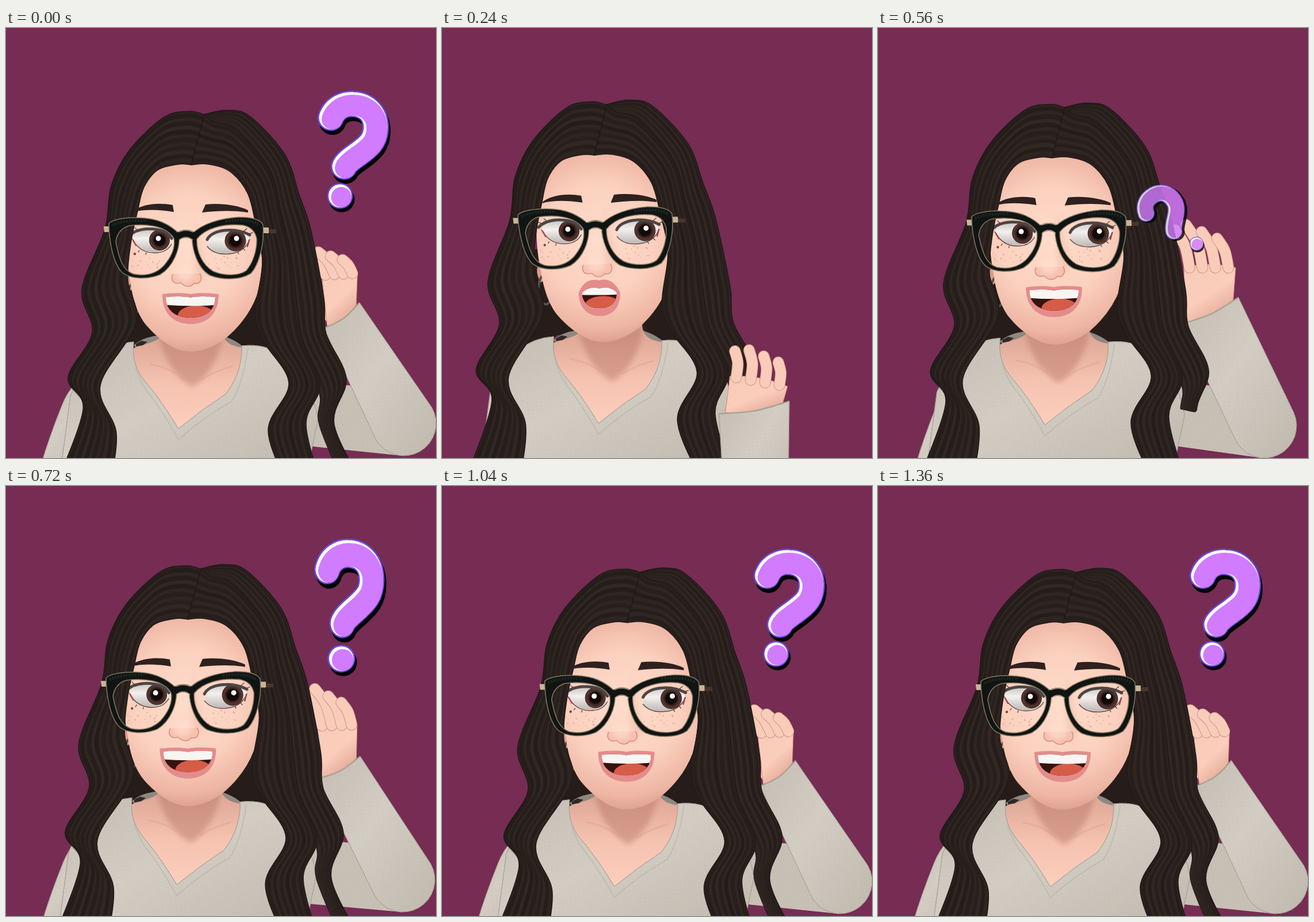
These frames come from a looping animation (748 px wide and 748 px high, 1.44 s). An HTML page:

```html
<!DOCTYPE html>
<html lang="en">
<head>
<meta charset="utf-8">
<title>Curious avatar</title>
<style>
html, body { margin: 0; height: 100%; overflow: hidden; background: #762c53; }
svg { display: block; width: 100vw; height: 100vh; }
</style>
</head>
<body>
<svg id="stage" viewBox="0 0 748 748">
  <defs>
    <radialGradient id="skin" gradientUnits="userSpaceOnUse" cx="318" cy="385" r="195">
      <stop offset="0" stop-color="#ffdccb"/><stop offset=".5" stop-color="#fbd0be"/>
      <stop offset=".8" stop-color="#eeb5a3"/><stop offset="1" stop-color="#d19484"/>
    </radialGradient>
    <linearGradient id="chest" x1="0" y1="0" x2="0" y2="1">
      <stop offset="0" stop-color="#d9a090"/><stop offset=".5" stop-color="#f5c2b0"/><stop offset="1" stop-color="#fdd0be"/>
    </linearGradient>
    <linearGradient id="palmFill" x1="0" y1="0" x2=".6" y2="1">
      <stop offset="0" stop-color="#f7cbb8"/><stop offset=".6" stop-color="#fbcdbb"/><stop offset="1" stop-color="#e3a896"/>
    </linearGradient>
    <linearGradient id="wool" x1="0" y1="0" x2="1" y2="1">
      <stop offset="0" stop-color="#cbc4ba"/><stop offset=".45" stop-color="#dcd6cc"/><stop offset="1" stop-color="#c6bfb4"/>
    </linearGradient>
    <linearGradient id="white" x1="0" y1="0" x2="0" y2="1">
      <stop offset="0" stop-color="#cbc6c3"/><stop offset=".4" stop-color="#f3f0ee"/><stop offset="1" stop-color="#bdb8b6"/>
    </linearGradient>
    <radialGradient id="iris"><stop offset=".5" stop-color="#120a09"/><stop offset=".65" stop-color="#3d2521"/><stop offset=".9" stop-color="#5a3a33"/><stop offset="1" stop-color="#2a1816"/></radialGradient>
    <pattern id="knit" width="8" height="6" patternUnits="userSpaceOnUse" patternTransform="rotate(-8)">
      <path d="M0,2q2,-2 4,0t4,0M0,5q2,-2 4,0t4,0" fill="none" stroke="#978f84" opacity=".42"/>
    </pattern>
    <filter id="soft" x="-30%" y="-30%" width="160%" height="160%"><feGaussianBlur stdDeviation="5"/></filter>
    <clipPath id="tuck"><path id="tuckPath"/></clipPath>
    <clipPath id="mouthClip"><path id="mouthHole"/></clipPath>
    <clipPath id="eyeL"><path id="eyePathL" d="M219,366C226,350 258,346 277,356Q287,363 288,376C276,396 232,396 219,366Z"/></clipPath>
    <clipPath id="eyeR"><path id="eyePathR" d="M350,380C354,356 380,348 402,351Q420,354 424,368C418,396 368,400 350,380Z"/></clipPath>
  </defs>
  <rect width="748" height="748" fill="#762c53"/>

  <g id="backHair"><path d="M205,400H460L470,590Q400,555 380,552L250,550L195,600Z" fill="#261d1a"/></g>

  <path id="sleeveL" d="M61,760Q75,712 98,655Q115,612 160,590L190,760Z"/>
  <g id="upperArm" fill="none" stroke-width="112" stroke-linecap="round"></g>
  <g id="body">
    <path d="M222,552Q238,536 275,534L372,534Q400,542 414,556L345,620H280Z" fill="#8f8880"/>
    <path d="M214,562C232,548 262,552 275,530L376,525C376,550 400,556 418,556L395,650L300,708L222,610Z" fill="url(#chest)"/>
    <path d="M266,535L376,530C376,560 356,606 324,624C296,608 272,575 266,535Z" fill="#b87768" opacity=".48" filter="url(#soft)"/>
    <path d="M250,585Q285,590 310,612M395,588Q360,598 340,612" fill="none" stroke="#d79b89" stroke-width="3" opacity=".35"/>
    <path class="wool" d="M95,770L112,640Q150,550 222,546C219,580 228,600 248,622Q274,654 300,697Q340,664 382,637C398,616 411,590 410,553Q455,548 480,572Q530,610 543,680L524,770Z"/>
    <path d="M225,590Q232,612 244,630Q270,662 300,716Q345,676 392,650Q412,620 421,556" fill="none" stroke="#b9b2a7" stroke-width="2" opacity=".6"/>
    <path d="M226,549l10,-5 10,2 -8,6 -12,2Z" fill="#2e2926"/>
  </g>

  <g id="arm"></g>

  <g id="head">
    <path d="M212,425q-7,15 3,33l12,-8V420Z" fill="#d99a89"/>
    <ellipse cx="223" cy="470" rx="12" ry="26" fill="none" stroke="#55504c" stroke-width="4"/>
    <path d="M322,225C395,225 440,285 445,350C448,395 445,435 436,466Q420,508 382,540Q350,563 320,563C290,563 258,535 240,512Q222,486 216,440C200,350 212,225 322,225Z" fill="url(#skin)"/>
    <path d="M330,330Q342,395 350,425L335,448Q322,400 330,330Z" fill="#e3a693" opacity=".3" filter="url(#soft)"/>
    <g id="freckles" fill="#a8654f" opacity=".4"></g>
    <circle cx="224" cy="393" r="2.2" fill="#7b4a41"/>

    <g clip-path="url(#eyeL)"><use href="#eyePathL" fill="url(#white)"/><circle cx="267" cy="369" r="18" fill="url(#iris)"/><circle cx="265" cy="366" r="4.5" fill="#fff"/></g>
    <g clip-path="url(#eyeR)"><use href="#eyePathR" fill="url(#white)"/><circle cx="399" cy="370" r="18.5" fill="url(#iris)"/><circle cx="401" cy="366" r="4.5" fill="#fff"/></g>
    <g fill="none" stroke-linecap="round">
      <path d="M219,366Q233,393 262,391Q280,390 288,376M350,380Q362,395 388,393Q414,391 424,368" stroke="#5b3a36" stroke-width="1.3"/>
      <path d="M221,369L226,378M423,369L420,380" stroke="#a8414a" stroke-width="2.5"/>
      <path d="M214,362C228,347 260,346 280,356L288,366M350,368C358,350 398,346 424,360" stroke="#4c4646" stroke-width="5"/>
      <path d="M219,355l-6,-2M228,351l-4,-4M414,353l5,-4M423,358l6,-2M232,387l-2,3M244,391l-1,3M403,390l2,3M413,384l3,3" stroke="#2b2020"/>
    </g>
    <path d="M290,428C285,440 293,447 304,443C312,452 322,451 327,444C337,447 343,437 337,427" fill="#f6c0ad" stroke="#d0917f" stroke-width="1.6"/>
    <ellipse cx="312" cy="428" rx="16" ry="13" fill="#ffe0d2" opacity=".65" filter="url(#soft)"/>

    <path id="lips" fill="#e48c8b"/>
    <g clip-path="url(#mouthClip)">
      <rect x="265" y="450" width="110" height="70" fill="#35130f"/>
      <ellipse id="tongue" cx="331" cy="500" rx="32" ry="17" fill="#d65c48"/>
      <path id="teeth" fill="#f8f5f2"/>
    </g>
  </g>

  <g id="hair"><g id="lockBack" clip-path="url(#tuck)"></g><g id="lockLeft"></g><g id="lockRight"></g></g>

  <g id="specs">
    <path d="M222,318C238,306 266,303 290,308L292,320C266,316 242,315 222,320ZM341,321L347,307C375,304 405,309 421,317L421,321C395,317 368,318 341,321Z" fill="#2e211f"/>
    <path d="M455,350h15v7h-15Z" fill="#49342d"/>
    <path d="M170,345h12l2,10h-13ZM445,347h12v10h-12Z" fill="#c8b596"/>
    <path fill-rule="evenodd" fill="#101513" stroke="#857760" stroke-width="1.5" d="M179,340C190,328 245,326 272,338Q290,346 301,358C304,385 290,416 268,429C246,438 218,437 203,426C185,410 179,365 179,340ZM191,372C197,404 204,422 222,428C242,432 260,428 274,414C288,398 295,382 292,366C279,344 245,340 214,344Q194,350 191,372ZM324,358C340,341 372,331 405,329Q440,329 447,342C450,375 440,412 426,427C406,440 374,438 354,430C334,418 322,385 324,358ZM332,367C331,390 342,412 360,423C380,432 406,431 418,422C430,408 437,385 436,366Q432,347 412,343C378,340 347,348 332,367Z"/>
    <path d="M298,355Q313,347 328,355L326,370Q313,360 300,370Z" fill="#101513"/>
    <path d="M300,355Q313,349 326,355M301,369Q313,359 325,369" fill="none" stroke="#a8977a" stroke-width="1.6"/>
    <path d="M185,343Q205,333 245,335M382,336Q425,331 441,343" fill="none" stroke="#1d2623" stroke-width="5" stroke-dasharray="3 2"/>
  </g>

  <g id="question">
    <g id="hook" fill="none" stroke-linecap="round" stroke-linejoin="round"></g>
    <g id="dot">
      <circle cx="3" cy="6" r="22.5"/><circle r="22.5" fill="#6a49dd"/><circle r="20" fill="#fff"/><circle cx="2.2" cy="2.2" r="17.6" fill="#d17bff"/>
    </g>
  </g>
</svg>
<script>
const NS = "http://www.w3.org/2000/svg";
const $ = id => document.getElementById(id);
const pts = s => s.split(" ").map(p => p.split(",").map(Number));
const lerp = (a, b, k) => a + (b - a) * k;
const mix = (a, b, k) => a.map((v, i) => lerp(v, b[i], k));
const polar = ([x, y], deg, r) => [x + r * Math.sin(deg * Math.PI / 180), y - r * Math.cos(deg * Math.PI / 180)];
// Falls smoothly from 1 to 0 around time mid
const fade = (t, mid, span) => 1 / (1 + Math.exp((t - mid) / span));

function add(parent, attrs, tag = "path") {
  const el = document.createElementNS(NS, tag);
  for (const k in attrs) el.setAttribute(k, attrs[k]);
  return parent.appendChild(el);
}

// Smooth curve through points
function spline(p, cmd = "M") {
  let d = cmd + p[0];
  for (let i = 0; i < p.length - 1; i++) {
    const b = p[i], c = p[i + 1], a = p[i - 1] || b, e = p[i + 2] || c;
    d += `C${b.map((v, j) => v + (c[j] - a[j]) / 6)} ${c.map((v, j) => v - (e[j] - b[j]) / 6)} ${c}`;
  }
  return d;
}

let seed = 7;
const rnd = () => (seed = seed * 16807 % 2147483647) / 2147483647;

// Hair lock between two edges, filled with strands
function lock(id, outer, inner, count) {
  const g = $(id), o = pts(outer), n = pts(inner);
  add(g, { d: spline(o) + spline(n.slice().reverse(), "L") + "Z", fill: "#2c2320", stroke: "#211916", "stroke-width": 1.5 });
  for (let i = 1; i < count; i++) {
    const k = i / count;
    add(g, {
      d: spline(o.map((p, j) => mix(p, n[j], k))), fill: "none",
      stroke: i % 2 ? "#1d1613" : "#3b302b", "stroke-width": 2 + rnd() * 5, opacity: .2 + rnd() * .3
    });
  }
}

lock("lockBack",
  "345,150 385,143 425,154 485,220 510,290 530,350 553,470 557,532 592,610 571,690 625,800",
  "338,175 360,172 395,180 450,250 470,330 485,400 492,480 505,545 545,635 545,690 590,800", 11);
lock("lockLeft",
  "346,151 320,145 275,155 215,212 183,275 172,350 132,455 150,530 108,608 134,664 85,800",
  "322,238 300,237 264,247 240,277 229,318 217,375 212,440 226,515 164,622 192,705 180,800", 13);
lock("lockRight",
  "345,151 360,163 400,178 460,250 480,330 497,400 506,480 516,545 546,622 522,690 550,800",
  "322,238 352,237 390,250 420,287 434,340 446,410 434,495 448,545 492,618 456,700 492,800", 12);

for (let i = 0; i < 34; i++) {
  const side = i % 2 ? 380 : 243;
  add($("freckles"), { cx: side + (rnd() - .5) * 54, cy: 408 + (rnd() - .5) * 22, r: .7 + rnd() * .6 }, "circle");
}

// Shaded wool shape with a knit overlay
function knit(el) {
  el.setAttribute("fill", "url(#wool)");
  el.setAttribute("stroke", "#aaa398");
  const top = el.cloneNode();
  top.removeAttribute("id");
  top.setAttribute("fill", "url(#knit)");
  el.after(top);
  return [el, top];
}
const sleeveL = knit($("sleeveL"));
knit(document.querySelector(".wool"));

const hookPath = "M565,156C572,137 590,131 603,132C628,133 643,150 643,172C643,196 630,206 612,219C596,230 590,236 588,241";
[["#000", 46, "3,7"], ["#6a49dd", 46, "0,0"], ["#fff", 41, "0,0"], ["#d17bff", 36.5, "2.3,2.3"]].forEach(([c, w, off]) =>
  add($("hook"), { d: hookPath, stroke: c, "stroke-width": w, transform: `translate(${off})` }));

const upper = ["#cec7bc", "url(#knit)"].map(stroke => add($("upperArm"), { stroke }));
const arm = $("arm");
const thumb = finger(18);
const palm = add(arm, { fill: "url(#palmFill)", stroke: "#cf9482" });
const fingers = [0, 1, 2, 3].map(() => finger(20));
const forearm = knit(add(arm, {}));
const cuff = add(arm, { fill: "none", stroke: "#a59d92", "stroke-width": 2.5, opacity: .7 });

function finger(width) {
  return ["#cf9583", "#f9ccba"].map((stroke, i) =>
    add(arm, { fill: "none", stroke, "stroke-width": width - i * 2, "stroke-linecap": "round" }));
}

// wrist x, y, cuff half width, cuff tilt, elbow x, y, palm height, palm turn, finger length, lean, curl, thumb
const low = [543, 660, 62, -10, 546, 810, 46, 10, 52, -10, 0, 0];
const dropped = low.map((v, i) => i === 1 || i === 5 ? v + 200 : v);
const poses = [
  [80, dropped], [240, low],
  [400, [576, 550, 66, -13, 618, 810, 70, 2, 88, -15, .35, 65]],
  [560, [577, 492, 55, -25, 672, 692, 75, 0, 80, -18, .05, 45]],
  [720, [579, 490, 42, -28, 690, 685, 74, -2, 70, -20, .1, 45]],
  [1040, [584, 500, 38, -36, 692, 688, 72, -3, 48, -30, .1, 45]]
];

function poseAt(t) {
  const i = poses.findIndex(p => p[0] > t);
  if (i < 0) return poses[poses.length - 1][1];
  const [a, b] = [poses[i - 1], poses[i]];
  const k = (t - a[0]) / (b[0] - a[0]);
  return mix(a[1], b[1], i === poses.length - 1 ? k * (2 - k) : k);
}

function drawArm(t) {
  const [x, y, half, tilt, ex, ey, height, turn, length, lean, curl, thumbLen] = poseAt(t);
  const wrist = [x, y], elbow = [ex, ey], r = 56;
  const left = polar(wrist, tilt - 90, half), right = polar(wrist, tilt + 90, half);
  const dir = Math.atan2(ex - x, y - ey) * 180 / Math.PI;
  const outer = polar(elbow, dir - 90, r), inner = polar(elbow, dir + 90, r);
  const rim = spline([left, polar(wrist, tilt + 180, 6), right]);
  forearm.forEach(el => el.setAttribute("d", `${rim}L${outer}A${r},${r} 0 0 1 ${inner}Z`));
  cuff.setAttribute("d", rim);
  upper.forEach(el => el.setAttribute("d", `M500,668L${elbow}`));

  const w = half * .82, top = polar(wrist, turn, height);
  const knuckle = k => polar(top, turn + 90, w * k);
  palm.setAttribute("d", `M${polar(wrist, tilt - 90, w)}L${knuckle(-1)}Q${polar(top, turn, 12)} ${knuckle(1)}L${polar(wrist, tilt + 90, w)}L${polar(wrist, 180, 15)}Z`);
  const bend = (els, base, deg, len) => els.forEach(el =>
    el.setAttribute("d", spline([base, polar(base, deg + 6, len * .55), polar(base, deg - 3, len)])));
  fingers.forEach((f, i) => {
    const len = length * (1 - .12 * Math.abs(i - 1)) * (1 - curl * Math.max(0, i - 1));
    bend(f, knuckle(i / 2 - .78), turn + lean, len);
  });
  bend(thumb, polar(left, tilt + 80, 20), turn - 46, thumbLen);

  const next = t < 480 ? $("question") : $("head");
  if (arm.nextElementSibling !== next) $("stage").insertBefore(arm, next);
}

// o: 0 is a wide smile, 1 a round open mouth
function drawMouth(o) {
  const c = 321 - 5 * o;
  const shape = (w, side, top, bottom) =>
    `M${c - w},${side}C${c - w * .7},${top} ${c - w * .3},${top - 1} ${c},${top + 2}C${c + w * .3},${top - 1} ${c + w * .7},${top} ${c + w},${side}` +
    `C${c + w},${lerp(side, bottom, .7)} ${c + w * .55},${bottom} ${c},${bottom}S${c - w},${lerp(side, bottom, .7)} ${c - w},${side}Z`;
  $("lips").setAttribute("d", shape(49 - 14 * o, 463 + 15 * o, 461 - 8 * o, 515 + 3 * o));
  $("mouthHole").setAttribute("d", shape(43 - 14 * o, 468 + 10 * o, 467 + o, 504));
  $("teeth").setAttribute("d", `M260,455H385V${480 - o}Q${c},${487 - 4 * o} 260,${480 - o}Z`);
  $("tongue").setAttribute("cx", 331 - 10 * o);
}

// Pops out of the hand, overshoots upward and settles
function drawQuestion(t) {
  const u = Math.max(0, t - 560);
  const k = 1 - Math.exp(-u / 55), hop = u < 400 ? Math.sin(Math.PI * u / 400) : 0;
  const size = lerp(.65, 1, k);
  $("question").setAttribute("visibility", t < 560 ? "hidden" : "visible");
  $("question").setAttribute("opacity", u ? 1 : .8);
  $("hook").setAttribute("transform", `translate(${lerp(500, 608, k)} ${lerp(318, 186, k) - 17 * hop}) rotate(${-42 * (1 - k)}) scale(${size} ${size + .14 * hop}) translate(-608 -186)`);
  $("dot").setAttribute("transform", `translate(${lerp(554, 581, k) + 4 * hop} ${lerp(375, 292, k) + 4 * hop}) scale(${lerp(.54, 1, k) + .1 * hop})`);
}

function lean(id, x, y, skew, tilt) {
  $(id).setAttribute("transform", `matrix(1 ${tilt} ${skew} 1 ${x - skew * 360} ${y - tilt * 313})`);
}

function draw(ms) {
  const t = Math.floor(ms % 1440 / 80) * 80 || 1440;
  const m = 1.13 * fade(t, 470, 110), x = -46 * m, y = -17 * fade(t, 660, 110);
  for (const id of ["head", "specs"]) lean(id, x, y, .03 * m, -.014 * m);
  for (const id of ["hair", "backHair"]) lean(id, x * 1.17, y, .022 * m, -.014 * m);
  $("body").setAttribute("transform", `translate(${x * .6} ${y * .55})`);
  sleeveL.forEach(el => el.setAttribute("transform", `translate(${Math.min(5, -x * .3)} 0)`));
  $("tuckPath").setAttribute("d", t < 640 ? "M0,0H748V640L590,655L568,682L540,676V600H0Z" : "M0,0H748V820H0Z");
  drawMouth(fade(t, 335, 40));
  drawArm(t);
  drawQuestion(t);
}

const start = performance.now();
function tick(now) {
  draw(Math.max(0, now - start));
  requestAnimationFrame(tick);
}
draw(0);
requestAnimationFrame(tick);
</script>
</body>
</html>
```
